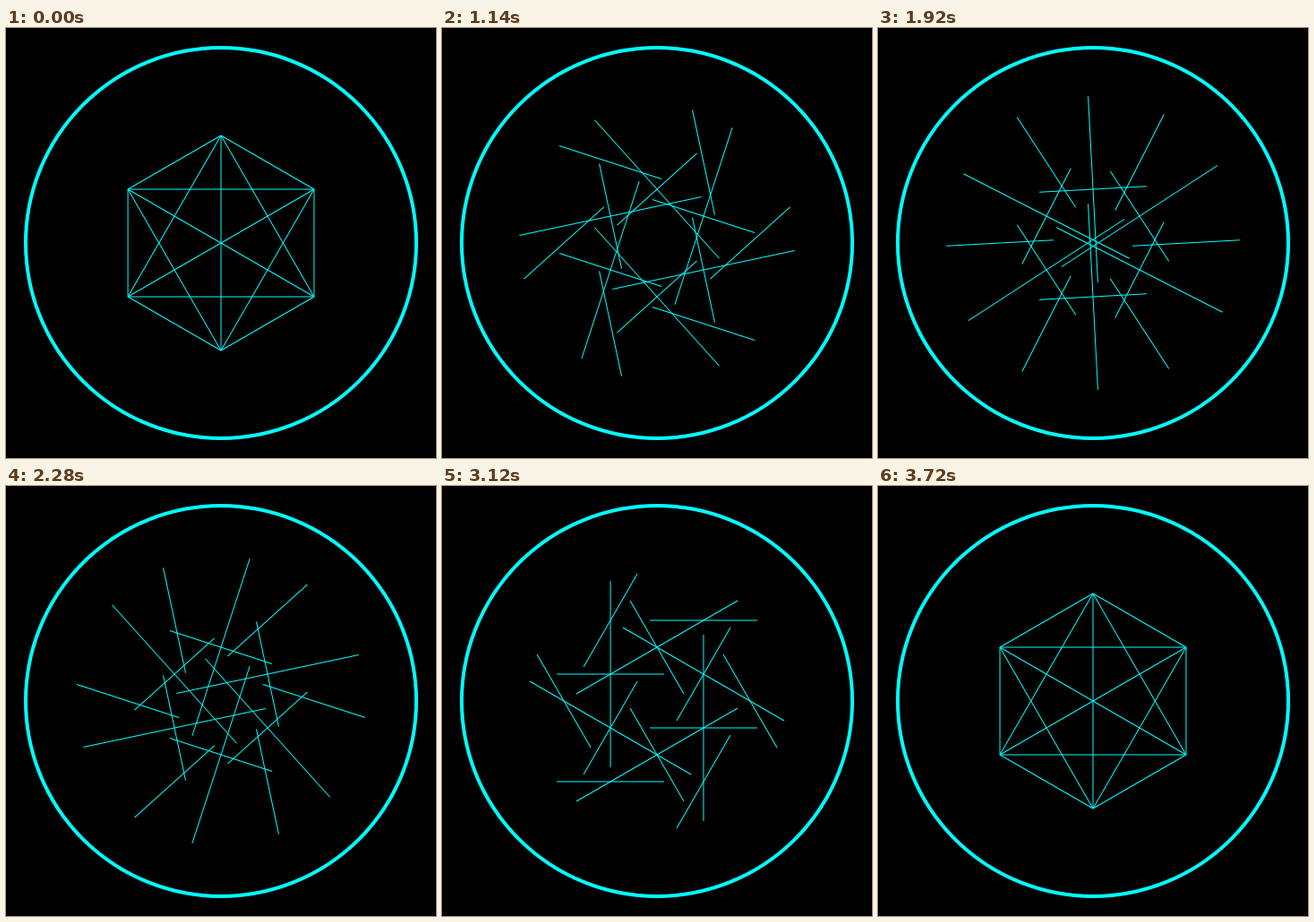
Write an HTML page that moves like this. It is 480 px wide and 480 px high and loops after 3.78 s.

```html
<!DOCTYPE html>
<html lang="en">
<head>
<meta charset="utf-8">
<title>Turning hexagon</title>
<style>
  html, body { margin: 0; width: 100%; height: 100%; overflow: hidden; background: #000; }
  svg { display: block; width: 480px; height: 480px; }
  svg * { fill: none; stroke: #0ff; }
</style>
</head>
<body>
<svg viewBox="0 0 480 480">
  <circle cx="240" cy="240" r="218" stroke-width="4"/>
  <g id="lines"></g>
</svg>
<script>
const R = 120;
const WIDE = R * Math.sqrt(3);
const TICK = 60;
const LOOP = 3780;
const HOLD = 3;
const group = document.getElementById('lines');
const bars = [];

// A bar centred at polar position (dist, dir), tilted relative to dir.
function addBar(dist, dir, length, tilt) {
  const rad = dir * Math.PI / 180;
  const line = document.createElementNS('http://www.w3.org/2000/svg', 'line');
  line.setAttribute('x1', -length / 2);
  line.setAttribute('x2', length / 2);
  group.append(line);
  bars.push({
    line,
    x: 240 + dist * Math.cos(rad),
    y: 240 + dist * Math.sin(rad),
    angle: dir + tilt
  });
}

for (let dir = -90; dir < 270; dir += 60) {
  addBar(R / 2, dir, R, 0);              // spoke
  addBar(R / 2, dir, WIDE, 90);          // short diagonal
  addBar(WIDE / 2, dir + 30, R, 90);     // side
}

// Sixty 3-degree positions spread over 59 ticks, so one is skipped halfway.
function turnAt(ms) {
  const step = Math.max(0, Math.floor(ms / TICK) - HOLD);
  return 3 * Math.round(step * 60 / 59);
}

let shown = -1;
function draw(turn) {
  if (turn === shown) return;
  shown = turn;
  for (const { line, x, y, angle } of bars) {
    line.setAttribute('transform', `translate(${x} ${y}) rotate(${angle + turn})`);
  }
}

const start = performance.now();
function frame() {
  draw(turnAt((performance.now() - start) % LOOP));
  requestAnimationFrame(frame);
}
frame();
</script>
</body>
</html>
```
